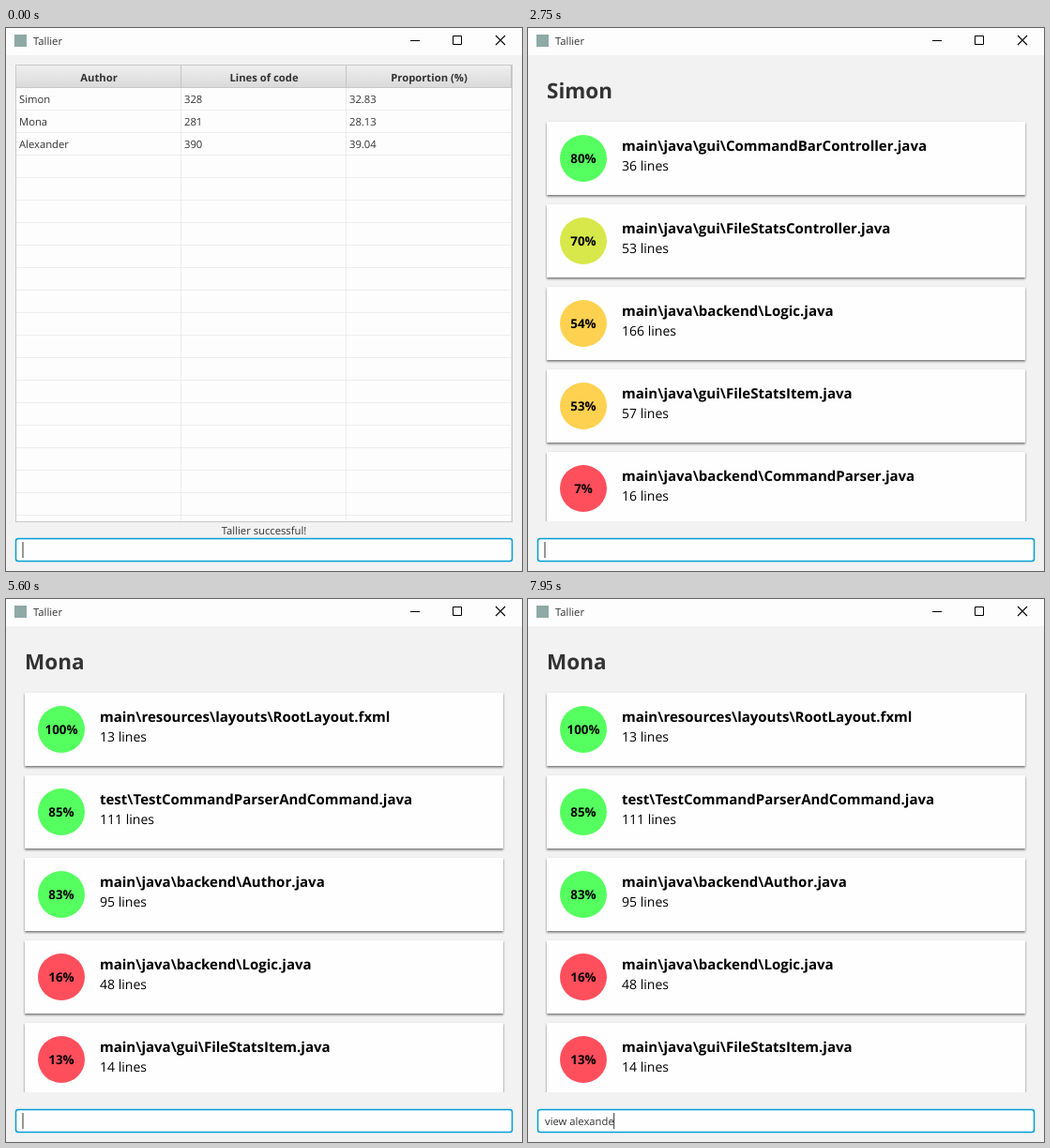
An HTML page for the animation above (8 s loop, 550 by 579 pixels).

```html
<!DOCTYPE html>
<html lang="en">
<head>
<meta charset="utf-8">
<title>Tallier</title>
<style>
  html, body { margin: 0; width: 100%; height: 100%; overflow: hidden; background: #f2f2f2; }
  svg { display: block; width: 550px; height: 579px; }
  text {
    font-family: "Open Sans", "Noto Sans", sans-serif;
    font-size: 11.25px; fill: #333; white-space: pre;
    text-rendering: geometricPrecision;
  }
  .bold { font-weight: 700; }
  .mid { text-anchor: middle; }
  .heading { font-size: 22.5px; }
  .file { font-size: 15px; fill: #000; }
  .lines { font-size: 14.06px; fill: #000; }
  .share { font-size: 13.4px; fill: #000; }
</style>
</head>
<body>
<svg id="stage" viewBox="0 0 550 579">
  <defs>
    <linearGradient id="head" x1="0" y1="0" x2="0" y2="1">
      <stop offset="0" stop-color="#efefef"/>
      <stop offset="1" stop-color="#d9d9d9"/>
    </linearGradient>
    <filter id="shadow" x="-5%" y="-10%" width="110%" height="125%">
      <feDropShadow dx="0" dy="1.5" stdDeviation="1.3" flood-color="#000" flood-opacity=".55"/>
    </filter>
    <clipPath id="listClip"><rect x="10" y="39" width="530" height="487"/></clipPath>
  </defs>
</svg>
<script>
const LOOP = 8000;
const FIELD_X = 18;
const GREEN = "#55ff5f", LIME = "#d8e84a", AMBER = "#ffd150", RED = "#ff4f5c";

const stage = document.getElementById("stage");

function add(parent, tag, attrs, content) {
  const el = document.createElementNS("http://www.w3.org/2000/svg", tag);
  for (const key in attrs) el.setAttribute(key, attrs[key]);
  if (content !== undefined) el.textContent = content;
  parent.appendChild(el);
  return el;
}
const rect = (parent, x, y, width, height, fill, more) =>
  add(parent, "rect", { x, y, width, height, fill, ...more });
const label = (parent, x, y, content, cls = "") =>
  add(parent, "text", { x, y, class: cls }, content);
const stroke = (parent, d, color, width = 1) =>
  add(parent, "path", { d, stroke: color, "stroke-width": width, fill: "none" });

function drawWindow() {
  rect(stage, 0, 0, 550, 579, "#f2f2f2");
  rect(stage, 0, 0, 550, 29, "#fdfdfd");
  rect(stage, 9, 7, 13, 13, "#8fa9a6");
  label(stage, 29, 18, "Tallier");
  stroke(stage, "M431 13.5H441M476.5 8.5H485.5V17.5H476.5Z", "#000");
  stroke(stage, "M522 8L532 18M532 8L522 18", "#000", 1.1);
}

function drawTable() {
  const g = add(stage, "g", {});
  const columns = [
    ["Author", "Simon", "Mona", "Alexander"],
    ["Lines of code", "328", "281", "390"],
    ["Proportion (%)", "32.83", "28.13", "39.04"]
  ];
  rect(g, 10.5, 39.5, 529, 487, "#fdfdfd", { stroke: "#c8c8c8" });
  for (let y = 87.5; y < 526; y += 24) stroke(g, `M11 ${y}H539`, "#ededed");
  rect(g, 11, 40, 528, 24, "url(#head)");
  stroke(g, "M11 63.5H539", "#c8c8c8");
  columns.forEach(([title, ...cells], i) => {
    const x = 11 + 176 * i, edge = x + 175.5;
    stroke(g, `M${edge} 64V526`, "#ebebeb");
    stroke(g, `M${edge} 40V64`, "#c4c4c4");
    label(g, x + 88, 57, title, "bold mid");
    cells.forEach((cell, row) => label(g, x + 3, 80 + 24 * row, cell));
  });
  label(g, 275, 540, "Tallier successful!", "mid");
  return g;
}

function drawFiles(name, files) {
  const g = add(stage, "g", { "clip-path": "url(#listClip)" });
  label(g, 20, 75, name, "bold heading");
  files.forEach(([share, color, path, lines], i) => {
    const card = add(g, "g", { transform: `translate(20 ${100 + 88 * i})` });
    rect(card, 0, 0, 510, 78, "#fefefe", { filter: "url(#shadow)" });
    add(card, "circle", { cx: 39, cy: 39, r: 25, fill: color });
    label(card, 39, 44, share + "%", "bold mid share");
    label(card, 80, 31, path, "bold file");
    label(card, 80, 52, lines + " lines", "lines");
  });
  return g;
}

drawWindow();
const views = [
  drawTable(),
  drawFiles("Simon", [
    [80, GREEN, "main\\java\\gui\\CommandBarController.java", 36],
    [70, LIME, "main\\java\\gui\\FileStatsController.java", 53],
    [54, AMBER, "main\\java\\backend\\Logic.java", 166],
    [53, AMBER, "main\\java\\gui\\FileStatsItem.java", 57],
    [7, RED, "main\\java\\backend\\CommandParser.java", 16]
  ]),
  drawFiles("Mona", [
    [100, GREEN, "main\\resources\\layouts\\RootLayout.fxml", 13],
    [85, GREEN, "test\\TestCommandParserAndCommand.java", 111],
    [83, GREEN, "main\\java\\backend\\Author.java", 95],
    [16, RED, "main\\java\\backend\\Logic.java", 48],
    [13, RED, "main\\java\\gui\\FileStatsItem.java", 14]
  ])
];

rect(stage, 10.5, 544.5, 529, 24, "#fefefe", { rx: 2.5, stroke: "#039ed3", "stroke-width": 1.5 });
const field = label(stage, FIELD_X, 561, "");
const caret = rect(stage, 0, 548, 1, 17, "#333");

// One scene per command: key press times and the spans when the caret is hidden.
const scenes = [
  { start: 0, command: "view simon",
    keys: [720, 870, 975, 1080, 1230, 1815, 1930, 2080, 2170, 2260],
    hidden: [[370, 720], [1700, 1815]] },
  { start: 2750, command: "view mona",
    keys: [3920, 4080, 4180, 4275, 4370, 4560, 4680, 4830, 4920],
    hidden: [[3150, 3670]] },
  { start: 5600, command: "view alexander",
    keys: [6120, 6270, 6330, 6390, 6550, 6730, 6940, 7220, 7620, 7700, 7785, 7870, 7950],
    hidden: [[6070, 6120]] }
];

function render(t) {
  const index = scenes.findLastIndex(s => t >= s.start);
  const { command, keys, hidden } = scenes[index];
  views.forEach((view, i) => view.setAttribute("display", i === index ? "inline" : "none"));

  const typed = command.slice(0, keys.filter(k => t >= k).length);
  if (field.textContent !== typed) field.textContent = typed;
  const width = typed ? field.getComputedTextLength() : 0;
  caret.setAttribute("x", FIELD_X - 0.5 + width);
  const off = hidden.some(([from, to]) => t >= from && t < to);
  caret.setAttribute("display", off ? "none" : "inline");
}

function tick() {
  render(performance.now() % LOOP);
  requestAnimationFrame(tick);
}
tick();
</script>
</body>
</html>
```
